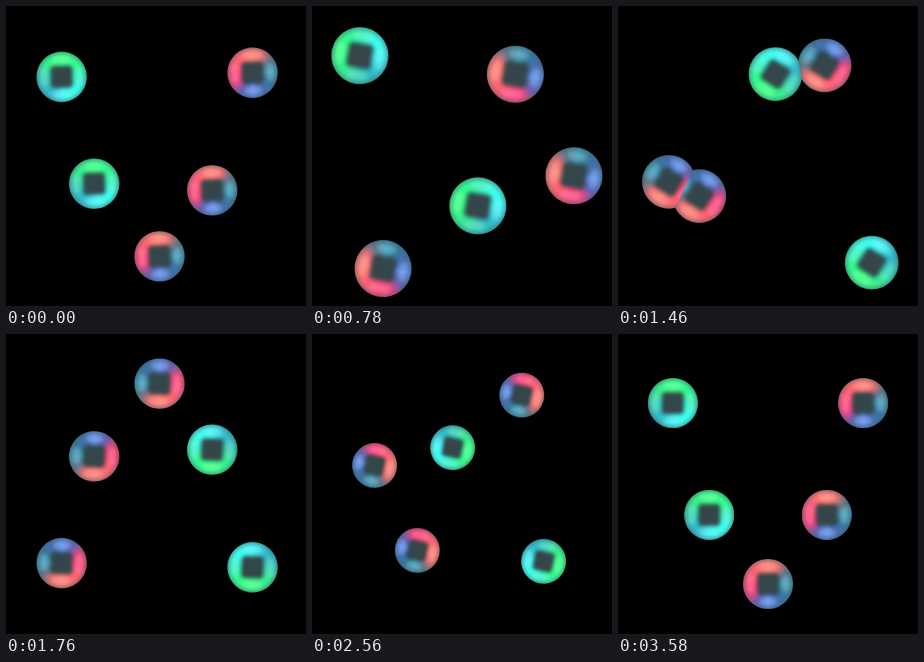
An HTML page with a canvas for the animation above (3600 ms loop, 300 by 300 pixels).

```html
<!DOCTYPE html>
<html>
<head>
<meta charset="utf-8">
<style>
  html, body { margin: 0; width: 100%; height: 100%; overflow: hidden; background: #000; }
  canvas { display: block; }
</style>
</head>
<body>
<canvas id="stage" width="300" height="300"></canvas>
<script>
const LOOP = 3600, STEP = 20, ORBIT = 100, RADIUS = 25.2;
const DEG = Math.PI / 180;
const ctx = document.getElementById('stage').getContext('2d');

// Glossy ball: colours run clockwise from the right edge, around a soft dark square.
function makeBall(colors) {
  const R = 60, canvas = document.createElement('canvas');
  canvas.width = canvas.height = 2 * R;
  const c = canvas.getContext('2d');
  c.translate(R, R);
  c.beginPath();
  c.arc(0, 0, R - 0.5, 0, 2 * Math.PI);
  c.clip();

  const hue = c.createConicGradient(0, 0, 0);
  [...colors, colors[0]].forEach((color, i) => hue.addColorStop(i / colors.length, color));
  c.fillStyle = hue;
  c.fillRect(-R, -R, 2 * R, 2 * R);

  const rim = c.createRadialGradient(0, 0, 0, 0, 0, R);
  rim.addColorStop(0.8, 'rgba(70,95,105,0)');
  rim.addColorStop(1, 'rgba(70,95,105,0.5)');
  c.fillStyle = rim;
  c.fillRect(-R, -R, 2 * R, 2 * R);

  c.filter = 'blur(5px)';
  c.fillStyle = 'rgba(255,255,255,0.2)';
  for (let side = 0; side < 4; side++) {
    c.rotate(Math.PI / 2);
    c.fillRect(34, -20, 15, 40);
  }
  c.fillStyle = 'rgb(52,70,74)';
  c.beginPath();
  c.roundRect(-26, -26, 52, 52, 8);
  c.fill();
  return canvas;
}

const red = makeBall(['#3c9bb4', '#37789b', '#466eb4', '#5a8ce6', '#5a64b4', '#f04682',
                      '#ff4678', '#ff5a76', '#ff6e70', '#ff7d70', '#f07070', '#55788c']);
const green = makeBall(['#32f0c0', '#3cfff0', '#3cf0f0', '#32b9c8',
                        '#32d2b4', '#37f08c', '#37ff82', '#32fa8c']);
const balls = [-2, -1, 0, 1, 2].map(j => ({ j, skin: j < 0 ? green : red }));

// Each ball is the sum of two opposite rotations, seen in perspective.
function place(j, turn, scale) {
  const a = ORBIT * scale * Math.cos(36 * j * DEG), p = (270 + 108 * j) * DEG + turn;
  const b = ORBIT * scale * Math.sin(36 * j * DEG), q = (180 - 108 * j) * DEG - turn;
  return {
    x: 150 + a * Math.cos(p) + b * Math.cos(q),
    y: 150 - a * Math.sin(p) - b * Math.sin(q)
  };
}

// Keep only the half plane nearer to `own`, so touching balls meet in a straight seam.
function clipSeam(own, other) {
  ctx.save();
  ctx.translate((own.x + other.x) / 2, (own.y + other.y) / 2);
  ctx.rotate(Math.atan2(own.y - other.y, own.x - other.x));
  ctx.beginPath();
  ctx.rect(0, -600, 600, 1200);
  ctx.restore();
  ctx.clip();
}

function draw(time) {
  const t = Math.floor((time % LOOP) / STEP) * STEP;
  const turn = (t + STEP) / LOOP * 2 * Math.PI;
  const scale = 1 / (1 - 0.122 * Math.sin(turn));
  const r = RADIUS * scale;
  const spots = balls.map(ball => place(ball.j, turn, scale));

  ctx.fillStyle = '#000';
  ctx.fillRect(0, 0, 300, 300);
  ctx.imageSmoothingQuality = 'high';
  spots.forEach((spot, i) => {
    ctx.save();
    spots.slice(0, i).forEach(other => clipSeam(spot, other));
    ctx.translate(spot.x, spot.y);
    ctx.rotate(-turn);
    ctx.drawImage(balls[i].skin, -r, -r, 2 * r, 2 * r);
    ctx.restore();
  });
}

const start = performance.now();
function tick() {
  draw(performance.now() - start);
  requestAnimationFrame(tick);
}
tick();
</script>
</body>
</html>
```
